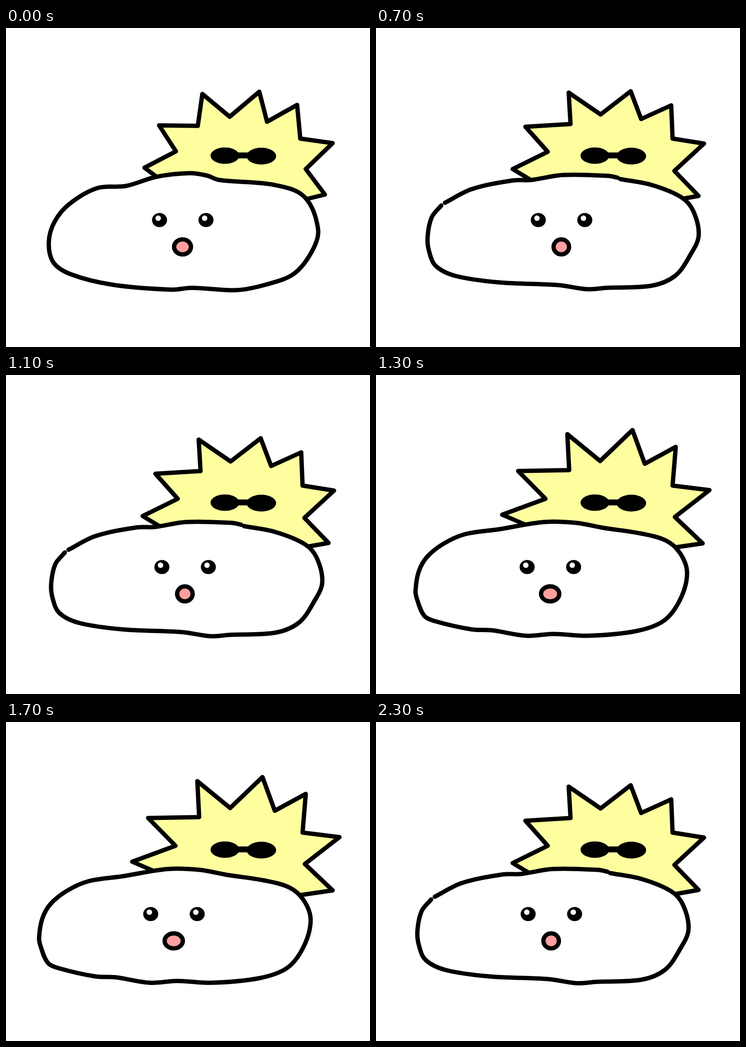
Recreate the animation shown at these times as an HTML page with a canvas. Size 799 by 701 pixels, loop 2400 ms.

```html
<!DOCTYPE html>
<html lang="en">
<head>
<meta charset="utf-8">
<title>Sun behind a cloud</title>
<style>
html, body { margin: 0; width: 100%; height: 100%; overflow: hidden; background: #fff; }
canvas { display: block; }
</style>
</head>
<body>
<canvas id="stage" width="799" height="701"></canvas>
<script>
const ctx = document.getElementById('stage').getContext('2d');
const STEP = 100, STEPS = 24, SWAY = 20, LINE = 9.5;
const YELLOW = '#fffe9f', PINK = '#ff9f9f';

// Key points of the three drawings: tips and notches of the sun,
// cloud strokes at rest, and the width of the mouth.
const small = {
  rays: [304,307, 373,271, 336,214, 421,215, 431,145, 491,195, 556,140, 573,206, 639,169,
    646,243, 717,253, 658,310, 700,366],
  cloud: [[94,470, 107,425, 140,386, 200,352, 264,347, 330,327, 402,319, 440,324, 468,334,
    590,345, 655,371, 685,442, 672,490, 632,540, 570,564, 505,576, 408,571, 363,575, 233,564,
    142,541, 104,515]],
  mouth: 18.5
};
const middle = {
  rays: [300,310, 377,272, 328,217, 427,211, 423,142, 493,190, 559,139, 582,200, 648,170,
    651,243, 720,254, 655,314, 708,369],
  cloud: [
    [132,384, 191,354, 281,335, 321,334, 391,323, 491,325, 511,329],
    [517,332, 586,345, 651,372, 677,402, 689,456, 671,498, 638,544, 587,566, 486,571, 444,574,
      381,565, 251,559, 156,545, 112,523, 97,490, 94,458, 103,416, 124,390]
  ],
  mouth: 17
};
const large = {
  rays: [277,307, 372,272, 312,211, 424,209, 420,130, 492,189, 563,121, 590,195, 658,158,
    651,243, 732,253, 656,312, 717,370],
  cloud: [[92,473, 99,432, 117,400, 153,371, 200,350, 275,339, 375,323, 445,325, 505,336,
    585,348, 642,364, 673,392, 688,435, 673,493, 637,540, 575,563, 470,573, 395,569, 335,573,
    260,561, 215,559, 135,541, 111,529, 95,492]],
  mouth: 20
};
const order = [small, large, small, middle];

// Sideways swing; the last quarter comes home a little faster.
function sway(n) {
  const s = Math.sin(n / STEPS * 2 * Math.PI);
  return n > 18 ? -SWAY * Math.pow(-s, 1.4) : SWAY * s;
}

// Smooth curve through [x, y, x, y, ...], with handles a third of each chord.
function curve(p, closed) {
  const n = p.length / 2;
  const at = i => {
    i = closed ? (i + n) % n : Math.max(0, Math.min(n - 1, i));
    return [p[2 * i], p[2 * i + 1]];
  };
  const angle = (a, b) => Math.atan2(b[1] - a[1], b[0] - a[0]);
  const path = new Path2D();
  path.moveTo(p[0], p[1]);
  for (let i = 0; i < (closed ? n : n - 1); i++) {
    const [a, b, c, d] = [at(i - 1), at(i), at(i + 1), at(i + 2)];
    const reach = Math.hypot(c[0] - b[0], c[1] - b[1]) / 3;
    const out = angle(a, c), into = angle(b, d);
    path.bezierCurveTo(
      b[0] + reach * Math.cos(out), b[1] + reach * Math.sin(out),
      c[0] - reach * Math.cos(into), c[1] - reach * Math.sin(into), c[0], c[1]);
  }
  if (closed) path.closePath();
  return path;
}

function oval(x, y, rx, ry, color) {
  ctx.fillStyle = color;
  ctx.beginPath();
  ctx.ellipse(x, y, rx, ry, 0, 0, 2 * Math.PI);
  ctx.fill();
}

function drawSun({ rays }) {
  ctx.beginPath();
  ctx.moveTo(340, 334);
  for (let i = 0; i < rays.length; i += 2) ctx.lineTo(rays[i], rays[i + 1]);
  ctx.lineTo(635, 382);
  ctx.fillStyle = YELLOW;
  ctx.fill();
  ctx.stroke();
  oval(480.5, 280.5, 31.5, 18, '#000');
  oval(560.5, 281.5, 32.5, 18.5, '#000');
  ctx.fillRect(505, 273.5, 30, 13);
}

function drawFace(mouth) {
  for (const x of [337, 439]) {
    oval(x, 422, 16.5, 15.5, '#000');
    oval(x - 3, 418, 6, 6, '#fff');
  }
  oval(387.5, 481, mouth, 16.5, PINK);
  ctx.stroke();
}

function drawCloud({ cloud, mouth }) {
  ctx.fillStyle = '#fff';
  ctx.fill(curve(cloud.flat(), true));
  for (const line of cloud) ctx.stroke(curve(line, cloud.length === 1));
  drawFace(mouth);
}

function draw(n) {
  const pose = order[n % order.length];
  ctx.fillStyle = '#fff';
  ctx.fillRect(0, 0, 799, 701);
  ctx.strokeStyle = '#000';
  ctx.lineWidth = LINE;
  ctx.lineCap = ctx.lineJoin = 'round';
  drawSun(pose);
  ctx.save();
  ctx.translate(sway(n), 0);
  drawCloud(pose);
  ctx.restore();
}

const start = performance.now();
function tick(now) {
  draw(Math.floor(Math.max(0, now - start) / STEP) % STEPS);
  requestAnimationFrame(tick);
}
draw(0);
requestAnimationFrame(tick);
</script>
</body>
</html>
```
